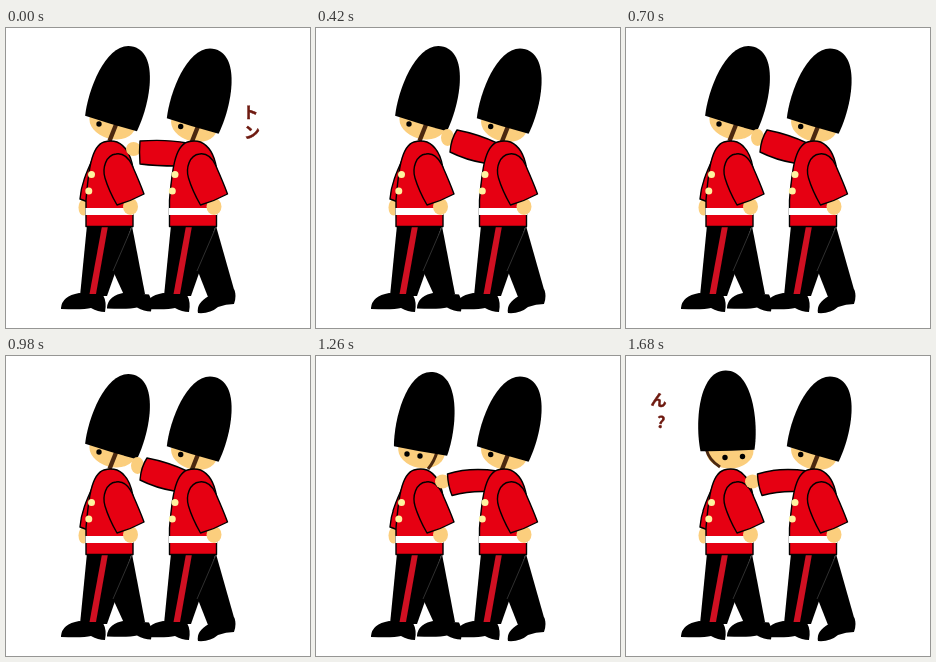
These frames come from a looping animation (304x300 px, 1960 ms). An HTML page:

```html
<!DOCTYPE html>
<html lang="ja">
<head>
<meta charset="utf-8">
<title>Two guards</title>
<style>
html, body { margin: 0; width: 100%; height: 100%; overflow: hidden; background: #fff; }
svg { display: block; width: 304px; height: 300px; }

.red { fill: #e60012; stroke: #000; stroke-width: 1.4; stroke-linejoin: round; }
.skin { fill: #fbce7d; }
.strap { fill: none; stroke: #4a2810; stroke-width: 4.4; }
.chin { stroke-width: 3; }
.button { fill: #fff3a0; }
.seam { fill: none; stroke: #444; stroke-width: .7; }
text {
  font: 700 16px "Noto Sans CJK JP", "Noto Sans CJK", sans-serif;
  fill: #6e1a10; stroke: #6e1a10; stroke-width: .4; text-anchor: middle;
}

/* One loop is 14 beats of 140 ms. */
.pose { visibility: hidden; animation: 1960ms step-end infinite; }
.tap { animation-name: tap; }
.up { animation-name: up; }
.raised { animation-name: raised; }
.press { animation-name: press; }
.side { animation-name: side; }
.turn { animation-name: turn; }
.front { animation-name: front; }
.look { animation-name: look; }
.sound { animation-name: sound; }
.sound2 { animation-name: sound2; }
.huh { animation-name: huh; }

@keyframes tap { 0% { visibility: visible } 7.142%, 100% { visibility: hidden } }
@keyframes up {
  0%, 14.285%, 28.571%, 42.857%, 57.142%, 100% { visibility: hidden }
  7.142%, 21.428%, 35.714%, 50% { visibility: visible }
}
@keyframes raised {
  0%, 21.428%, 50%, 100% { visibility: hidden }
  14.285%, 42.857% { visibility: visible }
}
@keyframes press {
  0%, 35.714% { visibility: hidden }
  28.571%, 57.142%, 100% { visibility: visible }
}
@keyframes side { 0% { visibility: visible } 64.285%, 100% { visibility: hidden } }
@keyframes turn { 0%, 71.428%, 100% { visibility: hidden } 64.285% { visibility: visible } }
@keyframes front { 0%, 78.571%, 100% { visibility: hidden } 71.428% { visibility: visible } }
@keyframes look { 0% { visibility: hidden } 78.571%, 100% { visibility: visible } }
@keyframes sound {
  0%, 28.571% { visibility: visible }
  7.142%, 35.714%, 100% { visibility: hidden }
}
@keyframes sound2 { 0%, 64.285%, 100% { visibility: hidden } 57.142% { visibility: visible } }
@keyframes huh { 0% { visibility: hidden } 85.714%, 100% { visibility: visible } }
</style>
</head>
<body>
<svg viewBox="0 0 304 300">
  <defs>
    <path id="hat" d="M-27 0C-32 -28 -27 -80 0 -80S32 -28 27 0Q0 1 -27 0Z"/>
    <ellipse id="face" class="skin" rx="23.500" ry="17"/>
    <circle id="eye" r="2.7"/>
    <path id="shoe" d="M55 280Q56 268 73 265L97 267Q101 274 99 284Q92 284 85 280Q78 282 55 281Z"/>

    <g id="profile">
      <use href="#face" transform="translate(106.500 94) rotate(15)"/>
      <path class="strap" d="M111 94L103.500 113"/>
      <use href="#eye" x="93" y="96"/>
      <use href="#hat" transform="translate(105 95.500) rotate(16.500)"/>
    </g>
    <g id="leg">
      <path d="M81 197H126L101 268H74Z"/>
      <use href="#shoe"/>
      <path fill="#d01022" d="M96 198H102L90 266H83.500Z"/>
      <path class="seam" d="M126 199L107 243"/>
    </g>
    <g id="torso">
      <path class="red" d="M80 198.500V172C82 150 84 118 98 114Q105 112 111 114C120 118 125 128 127 140V198.500Z"/>
      <path fill="#fff" d="M79.500 180H127.500V187H79.500Z"/>
      <circle class="button" cx="85.500" cy="146.500" r="3.500"/>
      <circle class="button" cx="82.800" cy="163" r="3.500"/>
      <ellipse class="skin" cx="124.500" cy="178.500" rx="7.500" ry="8.500"/>
      <path class="red" d="M110 126C100 127 96 140 99 150C102 160 107 170 111 177Q125 173 138 166C134 155 130 146 126 137C122 129 116 125 110 126Z"/>
    </g>
    <g id="reach">
      <ellipse class="skin" cx="131.500" cy="109.500" rx="6.500" ry="8.500"/>
      <path class="red" d="M181 115Q162 106 141 102Q135 111 134 124Q150 132 168 135L180 132Z"/>
    </g>
  </defs>

  <rect width="304" height="300" fill="#fff"/>

  <!-- front guard -->
  <path d="M107 243L126 198L139 266L118 267Z"/>
  <use href="#shoe" x="46" y="-.5"/>
  <use href="#leg"/>
  <ellipse class="skin" cx="77.500" cy="179.500" rx="5" ry="8"/>
  <path class="red" d="M88 128C80 145 75 157 74 171L82 174Z"/>

  <use class="pose side" href="#profile"/>
  <g class="pose turn">
    <use href="#face" transform="translate(105.500 95) rotate(10)"/>
    <path class="strap chin" d="M121 96Q118 106 112 113"/>
    <use href="#eye" x="91" y="98"/>
    <use href="#eye" x="104" y="100"/>
    <use href="#hat" transform="translate(104.500 95) rotate(10)"/>
  </g>
  <g class="pose front">
    <use href="#face" transform="translate(106 96) rotate(6)"/>
    <path class="strap chin" d="M129 96Q127 106 119 111"/>
    <use href="#eye" x="92" y="99"/>
    <use href="#eye" x="110.500" y="101"/>
    <use href="#hat" transform="translate(106.500 94.500) rotate(6)"/>
  </g>
  <g class="pose look">
    <use href="#face" transform="translate(104 95.500) rotate(-2)"/>
    <path class="strap chin" d="M80.500 94Q83 104 94 111"/>
    <use href="#eye" x="99" y="101.500"/>
    <use href="#eye" x="116.500" y="100.500"/>
    <use href="#hat" transform="translate(101.500 94.500) rotate(-1.500)"/>
  </g>
  <use href="#torso"/>

  <!-- rear guard -->
  <path d="M191 241L210 198L229 265L202 269Z"/>
  <path d="M192 285Q190 275 203 268L204 264L228 261Q231 268 228 276Q220 276 212 279Q204 286 192 285Z"/>
  <use href="#leg" x="84"/>
  <use href="#profile" x="81.700" y="2.500"/>

  <g class="pose tap">
    <ellipse class="skin" cx="127.500" cy="121" rx="7.500" ry="7"/>
    <path class="red" d="M181 115Q160 111 134 113Q133 124 134 136Q150 138 171 138L180 132Z"/>
  </g>
  <use class="pose up" href="#reach"/>
  <use class="pose raised" href="#reach" transform="rotate(9.500 180 122)"/>
  <g class="pose press">
    <ellipse class="skin" cx="126.500" cy="125.500" rx="7.500" ry="7"/>
    <path class="red" d="M181 115Q154 111 131.500 118Q132 130 136 139.500Q152 135 170 135.500L180 132Z"/>
  </g>

  <use href="#torso" x="83.500"/>

  <!-- sound words -->
  <g class="pose sound">
    <text x="244.500" y="90">ト</text>
    <text x="246" y="110">ン</text>
  </g>
  <g class="pose sound2">
    <text x="270.500" y="130">ト</text>
    <text x="273" y="149.500">ン</text>
  </g>
  <g class="pose huh">
    <text x="33" y="50" transform="rotate(8 33 44)">ん</text>
    <text x="35" y="72" transform="rotate(6 35 66)">?</text>
  </g>
</svg>
</body>
</html>
```
